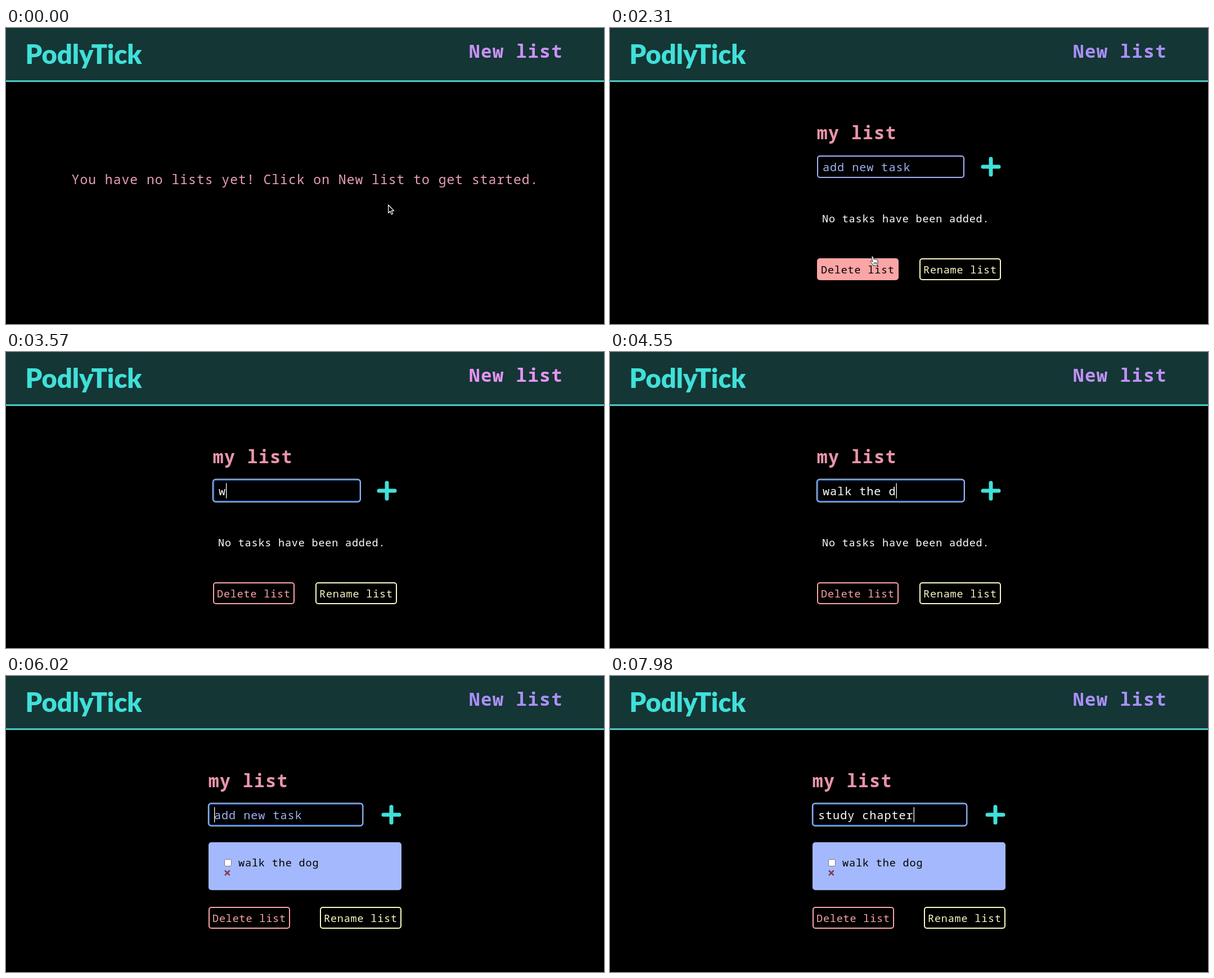
Write an HTML page that moves like this. It is 1063 px wide and 527 px high and loops after 8000 ms.

```html
<!DOCTYPE html>
<html lang="en">
<head>
<meta charset="utf-8">
<title>PodlyTick</title>
<style>
  html, body { margin: 0; width: 100%; height: 100%; overflow: hidden; background: #000; }
  svg { display: block; width: 100%; height: 100%; }
  text { white-space: pre; }
  .mono { font-family: "Noto Sans Mono", "DejaVu Sans Mono", monospace; letter-spacing: .0452em; }
  .brand { font: 900 47px Lato, sans-serif; fill: #40e0d8; }
  .menu { font: 600 12.8px Inter, sans-serif; fill: #f4f4f4; }
</style>
</head>
<body>
<svg id="stage" viewBox="0 0 1063 527"></svg>
<script>
const LOOP = 8000, STEP = 70;
const OPENED = 1470, FOCUSED = 2870, ADDED = 5600;
const SHIFT = 8; // the column widens on both sides once a task exists

const stage = document.getElementById('stage');

function add(parent, tag, attrs = {}, content = '') {
  const el = document.createElementNS('http://www.w3.org/2000/svg', tag);
  set(el, attrs);
  el.textContent = content;
  parent.append(el);
  return el;
}
function set(el, attrs) {
  for (const key in attrs) el.setAttribute(key, attrs[key]);
}
function show(el, on) {
  el.style.display = on ? '' : 'none';
}
function move(el, x, y = 0) {
  el.setAttribute('transform', `translate(${x} ${y})`);
}
// pitch is the distance from one character to the next
function mono(parent, x, y, pitch, fill, content, weight = 500) {
  return add(parent, 'text', {
    class: 'mono', x, y, fill, 'font-size': pitch * 1.55, 'font-weight': weight
  }, content);
}
function box(parent, x, y, width, height, rx, attrs) {
  return add(parent, 'rect', { x, y, width, height, rx, fill: 'none', ...attrs });
}
function button(parent, x, color, label) {
  const g = add(parent, 'g');
  const frame = box(g, x, 411, 143, 37, 4, { stroke: color, 'stroke-width': 2 });
  const caption = mono(g, x + 6, 437, 11.9, color, label);
  return { g, frame, caption };
}

// Header
box(stage, 0, 0, 1063, 94, 0, { fill: '#143635' });
box(stage, 0, 93.2, 1063, 2.9, 0, { fill: '#4fd3ca' });
add(stage, 'text', { class: 'brand', x: 34.5, y: 64 }, 'PodlyTick');
const newList = mono(stage, 823, 53, 20.9, '#c792fa', 'New list', 600);

// Empty page
const empty = mono(stage, 116.6, 278, 14.82, '#e8a0b2',
  'You have no lists yet! Click on New list to get started.');

// List page
const page = add(stage, 'g');
const leftSide = add(page, 'g');
const rightSide = add(page, 'g');
mono(leftSide, 367.8, 198, 20.3, '#e895aa', 'my list', 600);
const field = box(page, 369, 228, 260, 38, 4, { stroke: '#a5b4fc', 'stroke-width': 2 });
const ring = add(page, 'g');
const ringIn = box(ring, 369.3, 228.2, 260, 37.4, 4, { stroke: '#1d59b8', 'stroke-width': 2 });
const ringOut = box(ring, 367.7, 226.6, 262.4, 40.4, 5, { stroke: '#c4dcfb', 'stroke-width': 1.5 });
const entryGroup = add(page, 'g');
const entry = mono(entryGroup, 378, 254.5, 13.05, '#fff', '');
const caret = box(entryGroup, 378, 233.5, 1.3, 27, 0, { fill: '#fff' });
add(rightSide, 'path', {
  d: 'M663 247H691M677 233V261', stroke: '#40e0d8', 'stroke-width': 7, 'stroke-linecap': 'round'
});
const none = mono(page, 377, 346, 11.9, '#fff', 'No tasks have been added.');

const card = add(page, 'g');
box(card, 360, 296, 343, 85.3, 5, { fill: '#a4b9fd' });
box(card, 388.5, 326.5, 12, 12, 2.3, { fill: '#fff', stroke: '#767680' });
mono(card, 413, 339, 11.95, '#000', 'walk the dog');
add(card, 'path', {
  d: 'M389.8 347L397 354.2M397 347L389.8 354.2',
  stroke: '#86384f', 'stroke-width': 2.6, 'stroke-linecap': 'round'
});

const remove = button(page, 369, '#fca5a5', 'Delete list');
const rename = button(page, 551, '#fdf9c4', 'Rename list');

// Autofill menu
const menu = add(stage, 'g');
box(menu, 367, 267, 285, 230, 3, { fill: '#282b2c' });
['edewdwedwdewdewdwedewdwdwedwe', 'taslk', 'ww', 'www', 'ee', 'bhhj'].forEach((word, i) =>
  add(menu, 'text', { class: 'menu', x: 379, y: 298 + i * 35.65 }, word));

// Pointers, each with its hot spot at 0,0
const pointer = add(stage, 'g', { 'stroke-linejoin': 'round' });
const arrow = add(pointer, 'path', {
  d: 'M0 0V14.3L3.2 11.3L5.6 16.8L8 15.8L5.7 10.4H10Z',
  fill: '#000', stroke: '#fff', 'stroke-width': 1.2
});
const hand = add(pointer, 'path', {
  d: 'M-1 1C-1 -1 1.6 -1 2 1L3 5C3.4 4 5.2 4 5.5 5.3C6.2 4.6 7.7 4.9 8 6.1C9 5.7 10 6.3 10 7.5' +
     'L10 11C10 13 9 14 8.8 16H2C1.6 14 -1 11.5 -2.8 9.5C-3.6 8.2 -2 7 -.4 8.4L.8 9.5Z' +
     'M3.4 10V13.5M5.5 10V13.5M7.5 10V13.5',
  fill: '#fff', stroke: '#222', 'stroke-width': 1
});
const beam = add(pointer, 'g', { fill: 'none', 'stroke-linecap': 'round' });
for (const [stroke, width] of [['#fff', 3.2], ['#111', 1.2]])
  add(beam, 'path', {
    d: 'M-3.2 -8.5Q0 -8.5 0 -6Q0 -8.5 3.2 -8.5M0 -6V6M-3.2 8.5Q0 8.5 0 6Q0 8.5 3.2 8.5M-2 1.5H2',
    stroke, 'stroke-width': width
  });

// time, x, y
const route = [
  [210, 679.6, 315], [840, 826, 134], [1190, 887.6, 49.6], [1260, 887.6, 49.6], [1400, 905, 32],
  [1540, 908, 17], [1750, 850, 84], [2240, 466, 407], [2350, 466, 407], [2800, 494, 240]
];
function place(t) {
  const i = route.findIndex(p => p[0] > t);
  if (i < 1) return i ? route[route.length - 1].slice(1) : route[0].slice(1);
  const [t0, x0, y0] = route[i - 1], [t1, x1, y1] = route[i];
  const u = (t - t0) / (t1 - t0), k = u * u * (3 - 2 * u);
  return [x0 + (x1 - x0) * k, y0 + (y1 - y0) * k];
}

// text, first key, time between keys
const typing = [['walk the dog', 3500, 108], ['study chapter', 6300, 132]];
function typed(t) {
  const [word, start, gap] = typing[t < ADDED ? 0 : 1];
  const count = Math.max(0, Math.min(word.length, Math.floor((t - start) / gap) + 1));
  const last = count ? start + (count - 1) * gap : t < ADDED ? FOCUSED : ADDED;
  return { word: word.slice(0, count), idle: t - last };
}

function pulse(t) {
  const k = (1 - Math.cos((t - 400) / 1900 * 2 * Math.PI)) / 2;
  const mix = (a, b) => Math.round(a + (b - a) * k);
  return `rgb(${mix(170, 249)},${mix(143, 150)},${mix(249, 243)})`;
}

function draw(t) {
  newList.setAttribute('fill', pulse(t));
  const opened = t >= OPENED, focused = t >= FOCUSED, added = t >= ADDED;
  show(empty, !opened);
  show(page, opened);

  const dx = added ? SHIFT : 0, dy = added ? 1 : 0;
  for (const el of [leftSide, entryGroup]) move(el, -dx);
  move(rightSide, dx);
  move(remove.g, -dx, dy);
  move(rename.g, dx, dy);
  const extra = added ? 12.4 : 0;
  set(field, { x: 369 - dx, width: 260 + extra });
  set(ringIn, { x: 369.3 - dx, width: 260 + extra });
  set(ringOut, { x: 367.7 - dx, width: 262.4 + extra });
  show(field, !focused);
  show(ring, focused);
  show(none, !added);
  show(card, added);

  const { word, idle } = typed(t);
  entry.textContent = word || 'add new task';
  entry.setAttribute('fill', word ? '#fff' : '#9fb2f2');
  caret.setAttribute('x', 378 + word.length * 13.05);
  show(caret, focused && idle % 1000 < 500);
  show(menu, focused && t < typing[0][1]);

  const hover = t >= 2170 && t < 2450;
  remove.frame.setAttribute('fill', hover ? '#fca5a5' : 'none');
  remove.caption.setAttribute('fill', hover ? '#000' : '#fca5a5');

  const [x, y] = place(t);
  move(pointer, x, y);
  show(pointer, t < typing[0][1]);
  const onLink = hover || (t > 1260 && t < 1680);
  const onField = t > 2450 && y < 266;
  show(hand, onLink);
  show(beam, onField);
  show(arrow, !onLink && !onField);
}

const begin = performance.now();
function frame() {
  const t = (performance.now() - begin) % LOOP;
  draw(Math.floor(t / STEP) * STEP);
  requestAnimationFrame(frame);
}
draw(0);
requestAnimationFrame(frame);
</script>
</body>
</html>
```
